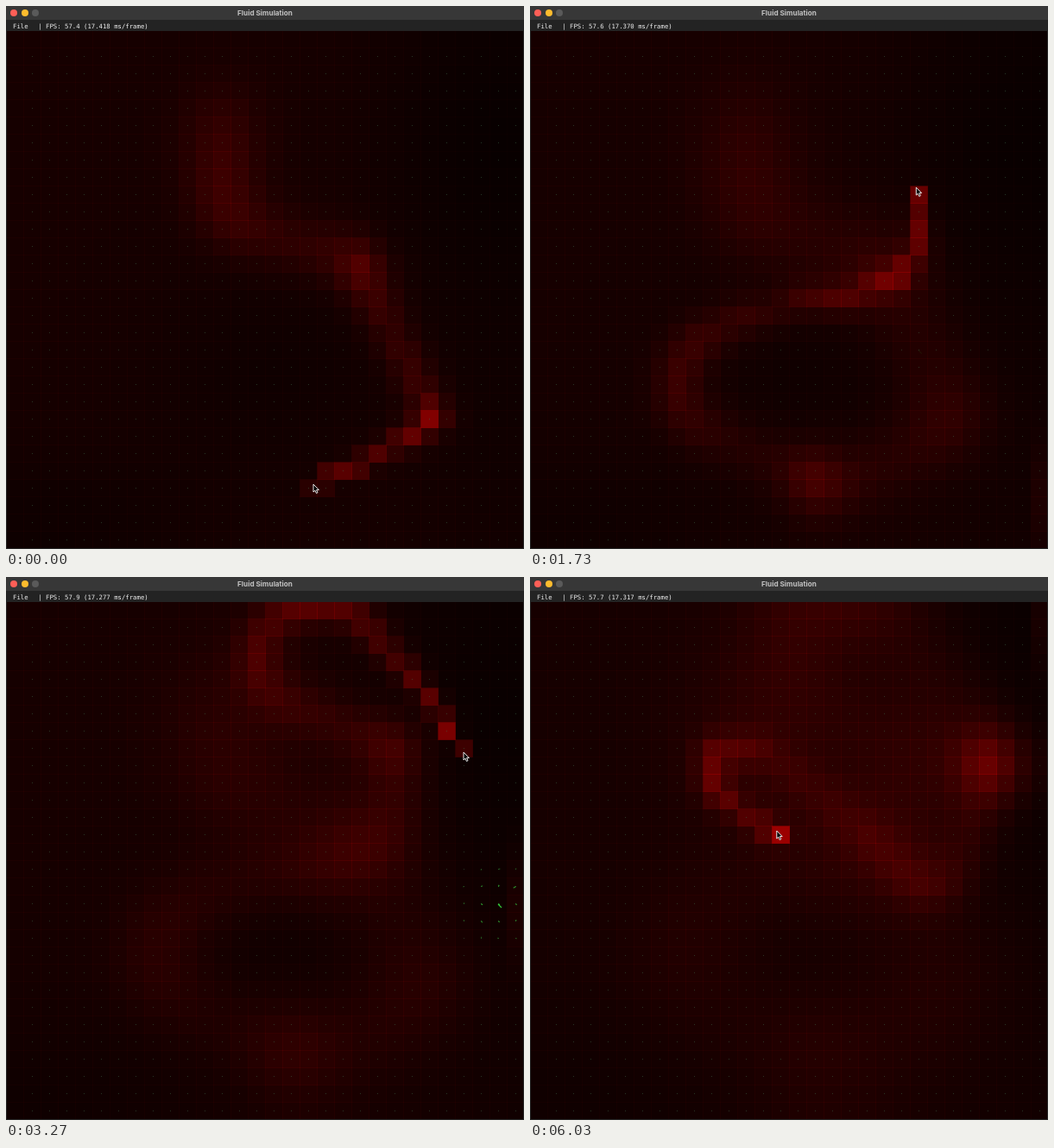
Write an HTML page with a canvas that moves like this. It is 600x629 px and loops after 6.06 s.

```html
<!DOCTYPE html>
<html lang="en">
<head>
<meta charset="utf-8">
<title>Fluid Simulation</title>
<style>
  html, body { margin: 0; width: 100%; height: 100%; overflow: hidden; background: #000; }
  #win { position: absolute; left: 0; top: 0; width: 600px; height: 629px; overflow: hidden; }
  canvas { position: absolute; left: 0; top: 0; }
  #title {
    position: absolute; left: 0; top: 0; width: 600px; height: 16px; background: #373737;
    color: #c2c2c2; font: 700 8.2px/16px Inter, sans-serif; text-align: center;
  }
  #title i {
    position: absolute; left: calc(5.2px + 12.3px * var(--n)); top: 4px;
    width: 8px; height: 8px; border-radius: 50%;
  }
  #menu {
    position: absolute; left: 0; top: 16px; width: 600px; height: 12.5px; background: #232323;
    color: #eee; font: 7.3px/13px "DejaVu Sans Mono", monospace; white-space: pre;
  }
  #menu span { position: absolute; top: 0.5px; }
  #edge { position: absolute; inset: 29px 0 0 0; border: solid #262626; border-width: 0 1px 1px; }
  #cursor { position: absolute; left: 0; top: 0; overflow: visible; }
</style>
</head>
<body>
<div id="win">
  <canvas id="view" width="600" height="629"></canvas>
  <div id="edge"></div>
  <div id="title">
    <i style="--n:0;background:#ff5f57"></i>
    <i style="--n:1;background:#febc2e"></i>
    <i style="--n:2;background:#5a5a5a"></i>
    Fluid Simulation
  </div>
  <div id="menu"><span style="left:8px">File</span><span id="fps" style="left:37.3px"></span></div>
  <svg id="cursor" width="8" height="12">
    <path d="M0 0V9L2 7.2 3.4 10.4 5 9.7 3.6 6.6H6.4Z" fill="#000" stroke="#fff" stroke-width=".9"/>
  </svg>
</div>
<script>
const N = 30, CELL = 20, LEFT = .5, TOP = 28.5, LOOP = 6060, FRAMES = 182;
const PRE_ROLL = 78, SPREAD = .022, SUBSTEPS = 3;
const ctx = document.getElementById('view').getContext('2d');
const fpsText = document.getElementById('fps');
const cursor = document.getElementById('cursor');

const startOf = k => Math.round(k * 10 / 3) * 10;
const bell = (d, s) => Math.exp(-d * d / (2 * s * s));
const midX = i => LEFT + (i + .5) * CELL;
const midY = j => TOP + (j + .5) * CELL;
const noise = (i, j, n) => {
  const s = Math.sin(i * 12.99 + j * 78.23 + n * 37.7) * 43758.5;
  return s - Math.floor(s);
};

function eachCell(draw) {
  for (let j = 0; j < N; j++) for (let i = 0; i < N; i++) draw(i, j, midX(i), midY(j));
}

// Pointer gesture as time, x, y; it begins before the loop so ink is already there
const gesture = [
  [-2600, 258, 112], [-1500, 264, 250], [-1150, 400, 292], [-800, 415, 312],
  [-480, 488, 462], [-260, 490, 485], [0, 356, 554],
  [130, 332, 552], [540, 322, 540], [700, 205, 492], [860, 168, 440], [1060, 212, 375],
  [1230, 328, 338], [1480, 430, 312], [1750, 448, 205], [2000, 452, 198],
  [2330, 313, 138], [2570, 290, 85], [2720, 320, 46], [2900, 402, 44],
  [3270, 530, 203], [3400, 531, 222], [4800, 531, 224],
  [5030, 470, 360], [5230, 375, 285], [5370, 276, 205],
  [5520, 212, 205], [5680, 209, 240], [5850, 280, 296], [LOOP, 286, 293]
];
const frameMs = [[0, 17.418], [1230, 17.349], [2330, 17.392], [3270, 17.277],
                 [4630, 17.258], [5370, 17.236], [6030, 17.317]];

// Smooth curve through timed keys
function track(keys, t) {
  const last = keys.length - 1;
  let i = 0;
  while (i < last - 1 && keys[i + 1][0] <= t) i++;
  const a = keys[i], b = keys[i + 1], span = b[0] - a[0];
  const before = keys[Math.max(0, i - 1)], after = keys[Math.min(last, i + 2)];
  const f = Math.min(1, Math.max(0, (t - a[0]) / span));
  const ease = f * f * (3 - 2 * f);
  return a.slice(1).map((v, n) => {
    const w = b[n + 1];
    const out = (w - before[n + 1]) / (b[0] - before[0]) * span;
    const into = (after[n + 1] - v) / (after[0] - a[0]) * span;
    return v + (w - v) * ease + out * f * (1 - f) ** 2 - into * f * f * (1 - f);
  });
}

function firstField() {
  const field = new Float32Array(N * N);
  eachCell((i, j, x, y) => {
    const blob = (cx, cy, sx, sy) => bell(x - cx, sx) * bell(y - cy, sy);
    field[j * N + i] = .085
      - .055 * blob(560, 150, 80, 130)
      - .035 * blob(60, 590, 110, 40)
      - .03 * blob(310, 420, 90, 80)
      - .025 * blob(570, 480, 50, 150);
  });
  return field;
}

// One step: spread to the neighbours, then ink along the pointer's way
function step(old, from, to) {
  const next = new Float32Array(N * N);
  const clip = n => Math.min(N - 1, Math.max(0, n));
  const at = (i, j) => old[clip(j) * N + clip(i)];
  eachCell((i, j) => {
    const around = at(i - 1, j) + at(i + 1, j) + at(i, j - 1) + at(i, j + 1);
    next[j * N + i] = at(i, j) + SPREAD * (around - 4 * at(i, j));
  });
  const [x0, y0] = track(gesture, from), [x1, y1] = track(gesture, to);
  const ink = .07 + .22 * Math.min(1, Math.hypot(x1 - x0, y1 - y0) / 18);
  for (let s = 0; s < SUBSTEPS; s++) {
    const [x, y] = track(gesture, from + (to - from) * s / SUBSTEPS);
    const col = clip(Math.floor((x - LEFT) / CELL)), row = clip(Math.floor((y - TOP) / CELL));
    next[row * N + col] += ink / SUBSTEPS;
  }
  return next;
}

const fields = [];
for (let k = -PRE_ROLL, field = firstField(); k < FRAMES; k++) {
  field = step(field, startOf(k - 1), startOf(k));
  if (k >= 0) fields[k] = field;
}

// Bursts of flow: peak time, origin, reach and length of the main stroke
const bursts = [
  [1230, 450, 399, 55, 39], [1230, 390, 459, 45, 17], [2330, 410, 259, 45, 10],
  [3270, 570, 379, 25, 4], [5370, 430, 219, 30, 3]
];

function stroke(x, y, dx, dy, alpha) {
  ctx.strokeStyle = `rgba(52,205,58,${alpha})`;
  ctx.beginPath();
  ctx.moveTo(x, y);
  ctx.lineTo(x + dx, y + dy);
  ctx.stroke();
}

function drawInk(field, t) {
  ctx.globalCompositeOperation = 'source-over';
  ctx.fillStyle = '#000';
  ctx.fillRect(0, 0, 600, 629);
  // Cells overlap a little, which leaves faint seams
  ctx.globalCompositeOperation = 'lighter';
  const rise = 495 - (t - 2330) * .12;
  eachCell((i, j, x, y) => {
    const glow = i === N - 1 ? .05 * bell(y - rise, 45) : 0;
    const red = Math.round(255 * Math.min(1, field[j * N + i] + glow));
    ctx.fillStyle = `rgb(${red},0,0)`;
    ctx.fillRect(x - CELL / 2, y - CELL / 2, CELL + .3, CELL + .3);
  });
  ctx.globalCompositeOperation = 'source-over';
}

function drawFlow(t) {
  ctx.lineWidth = 1.1;
  ctx.fillStyle = 'rgba(62,105,72,.5)';
  eachCell((i, j, x, y) => {
    if (i && j) ctx.fillRect(x - .5, y - .5, 1, 1);
  });
  for (const [peak, bx, by, reach, len] of bursts) {
    const k = bell(t - peak, 230);
    if (k < .03) continue;
    stroke(bx, by, len * k, len * k, k);
    eachCell((i, j, x, y) => {
      const w = k * bell(Math.hypot(x - bx, y - by), reach);
      if (w < .1) return;
      const angle = 2 * Math.PI * noise(i, j, 1);
      const size = 1 + w + 6 * w * noise(i, j, 2) ** 4;
      stroke(x, y, size * Math.cos(angle), size * Math.sin(angle), Math.min(.85, .2 + w));
    });
  }
}

function render() {
  const now = performance.now() % LOOP;
  let k = Math.min(FRAMES - 1, Math.ceil(now * .03));
  while (startOf(k) > now) k--;
  const t = startOf(k);
  drawInk(fields[k], t);
  drawFlow(t);
  const [x, y] = track(gesture, t), [ms] = track(frameMs, t);
  cursor.style.transform = `translate(${x}px,${y}px)`;
  fpsText.textContent = `| FPS: ${(1000 / ms).toFixed(1)} (${ms.toFixed(3)} ms/frame)`;
  requestAnimationFrame(render);
}
render();
</script>
</body>
</html>
```
